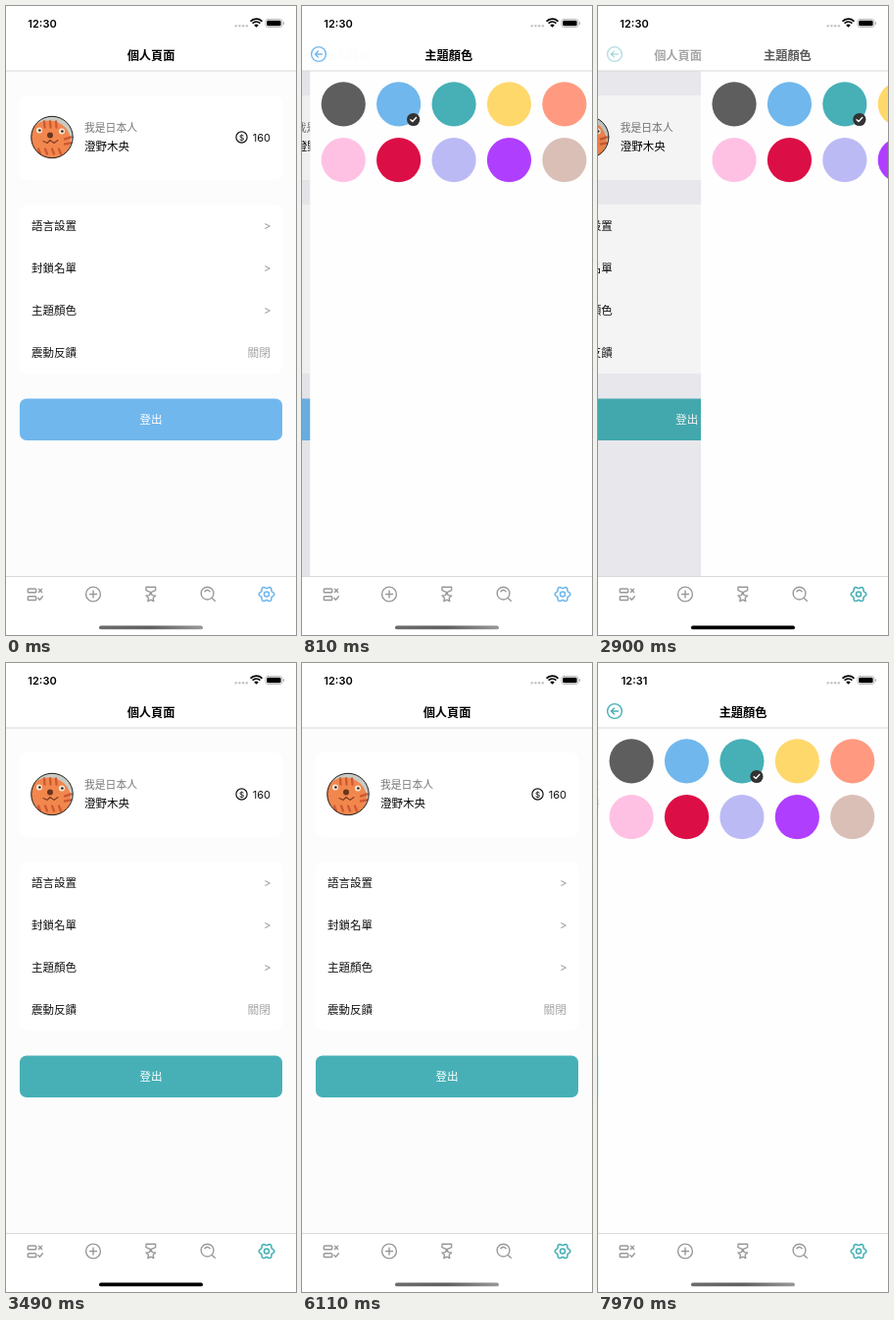
Animation of 296 by 640 pixels, one loop 8000 ms. Source, as an HTML page with a canvas:

```html
<!DOCTYPE html>
<html lang="zh-Hant">
<head>
<meta charset="utf-8">
<title>Theme colour settings</title>
<style>
html, body { margin: 0; width: 100%; height: 100%; overflow: hidden; background: #fff; }
canvas { display: block; width: 296px; height: 640px; }
</style>
</head>
<body>
<canvas id="stage"></canvas>
<script>
const W = 296, H = 640, LOOP = 8000;
const canvas = document.getElementById('stage');
const ctx = canvas.getContext('2d');
const dpr = window.devicePixelRatio || 1;
canvas.width = W * dpr;
canvas.height = H * dpr;

const CJK = '"Noto Sans CJK TC", "Noto Sans CJK HK", "Noto Sans CJK SC", "Noto Sans CJK JP", "Noto Sans CJK", sans-serif';
const LATIN = 'Inter, Roboto, sans-serif';
const INK = '#111', GREY = '#999';
const BLUE = [112, 183, 237], TEAL = [70, 176, 182];
const SWATCHES = ['#5e5e5e', '#70b7ed', '#46b0b6', '#ffd86c', '#ff9a80',
                  '#ffc1e3', '#dc0e46', '#bcbaf5', '#b03eff', '#dabfb7'];

const clamp = v => Math.max(0, Math.min(1, v));
const smooth = v => { v = clamp(v); return v * v * (3 - 2 * v); };
const mix = (a, b, k) => `rgb(${a.map((v, i) => Math.round(v + (b[i] - v) * k))})`;

// Critically damped spring, 0 to 1
function spring(ms) {
  if (ms <= 0) return 0;
  if (ms >= 600) return 1;
  const k = 0.0175 * ms;
  return 1 - Math.exp(-k) * (1 + k);
}
const headerEase = ms => 1 - Math.pow(1 - clamp(ms / 335), 1.64);

// y is the visual middle of the line
function text(str, x, y, size, color = INK, align = 'left', weight = 400, font = CJK) {
  ctx.font = `${weight} ${size}px ${font}`;
  ctx.textAlign = align;
  ctx.fillStyle = color;
  ctx.fillText(str, x, y + size * 0.37);
}
function disc(x, y, r, color) {
  ctx.beginPath();
  ctx.arc(x, y, r, 0, Math.PI * 2);
  ctx.fillStyle = color;
  ctx.fill();
}
function ring(x, y, r) {
  ctx.beginPath();
  ctx.arc(x, y, r, 0, Math.PI * 2);
  ctx.stroke();
}
function box(x, y, w, h, r, color) {
  ctx.beginPath();
  ctx.roundRect(x, y, w, h, r);
  if (color) { ctx.fillStyle = color; ctx.fill(); } else ctx.stroke();
}
function line(...p) {
  ctx.beginPath();
  for (let i = 0; i < p.length; i += 2) ctx.lineTo(p[i], p[i + 1]);
  ctx.stroke();
}
function pen(color, width) {
  ctx.strokeStyle = color;
  ctx.lineWidth = width;
  ctx.lineCap = ctx.lineJoin = 'round';
}
// Closed outline whose radius depends on the angle
function radial(x, y, n, radius) {
  ctx.beginPath();
  for (let i = 0; i < n; i++) {
    const a = i / n * Math.PI * 2 - Math.PI / 2, r = radius(i, a);
    ctx.lineTo(x + r * Math.cos(a), y + r * Math.sin(a));
  }
  ctx.closePath();
  ctx.stroke();
}

function avatar(x, y) {
  ctx.save();
  ctx.translate(x, y);
  ctx.beginPath();
  ctx.arc(0, 0, 21.5, 0, Math.PI * 2);
  ctx.clip();
  ctx.fillStyle = '#c8cbc4';
  ctx.fillRect(-22, -22, 44, 44);
  ctx.beginPath();
  ctx.ellipse(-3, 3, 22, 20, 0.1, 0, Math.PI * 2);
  ctx.fillStyle = '#f2874e';
  ctx.fill();
  pen('#cf5a33', 2.4);
  for (const sx of [-8, -2, 4]) line(sx, -16, sx + 0.5, -10);
  for (const sx of [-14, -7, 0, 7]) line(sx, 12, sx + 2, 17);
  line(13, 2, 19, 0);
  line(13, 7, 19, 6);
  for (const [ex, ey] of [[-13, -7], [10, -6]]) {
    disc(ex, ey, 3, '#f4ead8');
    disc(ex + 0.4, ey, 1.3, '#332018');
  }
  disc(-2, -2, 3, '#68361f');
  pen('#7c3c22', 1.1);
  line(-9, 4, -5, 6, -2, 3, 2, 6, 6, 3);
  ctx.restore();
  pen('#222', 1);
  ring(x, y, 21.2);
}

function profile(theme, p) {
  ctx.fillStyle = mix([252, 252, 253], [242, 242, 247], clamp(p * 2));
  ctx.fillRect(0, 66, W + 100, 515);
  box(14, 91, 268, 86, 7, '#fff');
  box(14, 202, 268, 172, 7, '#fff');
  avatar(47, 133.5);
  text('我是日本人', 80, 124.5, 10.8, '#777');
  text('澄野木央', 80, 143, 11.5, '#000', 'left', 500);
  pen(INK, 1.2);
  ring(240.5, 133.5, 5.6);
  text('$', 240.5, 133.6, 8, INK, 'center', 500, LATIN);
  text('160', 270, 133.5, 11, INK, 'right', 400, LATIN);
  ['語言設置', '封鎖名單', '主題顏色', '震動反饋'].forEach((label, i) => {
    const y = 224 + i * 42.8;
    text(label, 26, y, 11.5, INK, 'left', 500);
    if (i < 3) text('>', 270.5, y, 11.5, GREY, 'right', 400, LATIN);
    else text('關閉', 270, y, 11.8, '#a5a5a5', 'right');
  });
  box(14, 399.5, 268, 42.5, 7, theme);
  text('登出', 148, 421, 11.5, '#fff', 'center');
  ctx.fillStyle = `rgba(0,0,0,${0.065 * p})`;
  ctx.fillRect(0, 66, W + 100, 515);
}

function tick(i, alpha) {
  if (!alpha) return;
  const x = 49 + 56.4 * i, y = 115.5;
  ctx.globalAlpha = alpha;
  disc(x, y, 6.6, '#333');
  pen('#fff', 1.4);
  line(x - 2.8, y + 0.2, x - 0.8, y + 2.1, x + 2.9, y - 1.9);
  ctx.globalAlpha = 1;
}

function palette(k) {
  ctx.fillStyle = '#fefefe';
  ctx.fillRect(0, 66, W, 515);
  SWATCHES.forEach((c, i) => disc(34 + 56.4 * (i % 5), i < 5 ? 99.8 : 156.7, 22.6, c));
  tick(1, 1 - k);
  tick(2, k);
}

function statusBar(clock) {
  text(clock, 37, 17.5, 11, '#000', 'center', 600, LATIN);
  for (let i = 0; i < 4; i++) disc(234.7 + i * 3.7, 20.3, 1.2, '#c4c4c4');
  pen('#000', 1.7);
  ctx.lineCap = 'butt';
  for (const r of [8.2, 5.3]) {
    ctx.beginPath();
    ctx.arc(255.5, 21.3, r, -Math.PI * 0.76, -Math.PI * 0.24);
    ctx.stroke();
  }
  ctx.beginPath();
  ctx.moveTo(255.5, 21.8);
  ctx.arc(255.5, 21.8, 3.2, -Math.PI * 0.76, -Math.PI * 0.24);
  ctx.fillStyle = '#000';
  ctx.fill();
  pen('#aaa', 0.8);
  box(264.9, 13.4, 17, 8.2, 2.4);
  box(266.2, 14.7, 14.4, 5.6, 1.4, '#000');
  box(282.8, 16, 1.1, 3, 0.5, '#aaa');
}

function header(theme, h, backAlpha) {
  ctx.fillStyle = '#fff';
  ctx.fillRect(0, 0, W, 66);
  ctx.fillStyle = '#d9d9d9';
  ctx.fillRect(0, 65.5, W, 1);
  ctx.globalAlpha = 1 - h;
  text('個人頁面', 148 - 103 * h, 50, 12.2, '#000', 'center', 600);
  ctx.globalAlpha = h;
  text('主題顏色', 148 + 128 * (1 - h), 50, 12.2, '#000', 'center', 600);
  ctx.globalAlpha = backAlpha;
  pen(theme, 1.4);
  ring(17, 49, 7.4);
  line(20.5, 49, 13.7, 49);
  line(16.4, 46, 13.5, 49, 16.4, 52);
  ctx.globalAlpha = 1;
}

const TABS = [
  () => {
    box(22.3, 593, 8.4, 3.8, 0.8);
    box(22.3, 600.7, 8.4, 3.8, 0.8);
    line(33.4, 593.2, 36.6, 596.4);
    line(36.6, 593.2, 33.4, 596.4);
    line(32.8, 602.6, 34.4, 604.2, 37.4, 600.8);
  },
  () => {
    ring(89, 598.5, 7.4);
    line(85.5, 598.5, 92.5, 598.5);
    line(89, 595, 89, 602);
  },
  () => {
    line(143, 591.3, 152.6, 591.3, 152.6, 594.6, 147.8, 596.6, 143, 594.6, 143, 591.3);
    radial(147.8, 601.6, 10, i => i % 2 ? 2.5 : 5);
  },
  () => {
    ring(205.5, 597.6, 6.4);
    line(210.3, 602.4, 213.3, 605.3);
    ctx.beginPath();
    ctx.arc(205.5, 597.6, 3.2, -Math.PI * 0.8, -Math.PI * 0.2);
    ctx.stroke();
  },
  () => {
    radial(266, 598.5, 72, (i, a) => 6.9 + 0.9 * Math.cos(6 * a));
    ring(266, 598.5, 2.5);
  }
];

function tabBar(theme, active, dark) {
  ctx.fillStyle = '#fff';
  ctx.fillRect(0, 580, W, 60);
  ctx.fillStyle = '#d9d9d9';
  ctx.fillRect(0, 580, W, 1);
  TABS.forEach((icon, i) => {
    pen(i === active ? theme : GREY, i === active ? 1.6 : 1.4);
    icon();
  });
  let fill = '#000';
  if (!dark) {
    fill = ctx.createLinearGradient(95, 0, 201, 0);
    fill.addColorStop(0, '#6c6c6c');
    fill.addColorStop(0.5, '#606060');
    fill.addColorStop(1, '#999');
  }
  box(95, 630.5, 106, 3.8, 1.9, fill);
}

function draw(t) {
  const k = clamp((t - 1780) / 280);
  const theme = mix(BLUE, TEAL, k);
  const away = t >= 4800 && t < 6110;

  // p: page slide, h: header crossfade
  let p, h, backAlpha;
  if (t >= 2700 && t < 7390) {
    p = h = 1 - smooth((t - 2700) / 500);
    backAlpha = h * h;
  } else {
    const ms = t - (t < 2700 ? 500 : 7390);
    p = spring(ms);
    h = headerEase(ms);
    backAlpha = Math.sqrt(h);
  }

  ctx.setTransform(dpr, 0, 0, dpr, 0, 0);
  ctx.fillStyle = '#fff';
  ctx.fillRect(0, 0, W, H);

  if (away) {
    ctx.fillStyle = '#d9d9d9';
    ctx.fillRect(0, 65.5, W, 1);
  } else {
    if (p < 1) {
      ctx.save();
      ctx.translate(-0.3 * W * p, 0);
      profile(theme, p);
      ctx.restore();
    }
    if (p > 0) {
      ctx.save();
      ctx.translate(W * (1 - p), 0);
      palette(k);
      ctx.restore();
    }
    header(theme, h, backAlpha);
  }
  statusBar(t < 6510 ? '12:30' : '12:31');
  tabBar(theme, away ? 0 : 4, t >= 2740 && t < 6110);
}

const start = performance.now();
function loop() {
  draw((performance.now() - start) % LOOP);
  requestAnimationFrame(loop);
}
loop();
</script>
</body>
</html>
```
